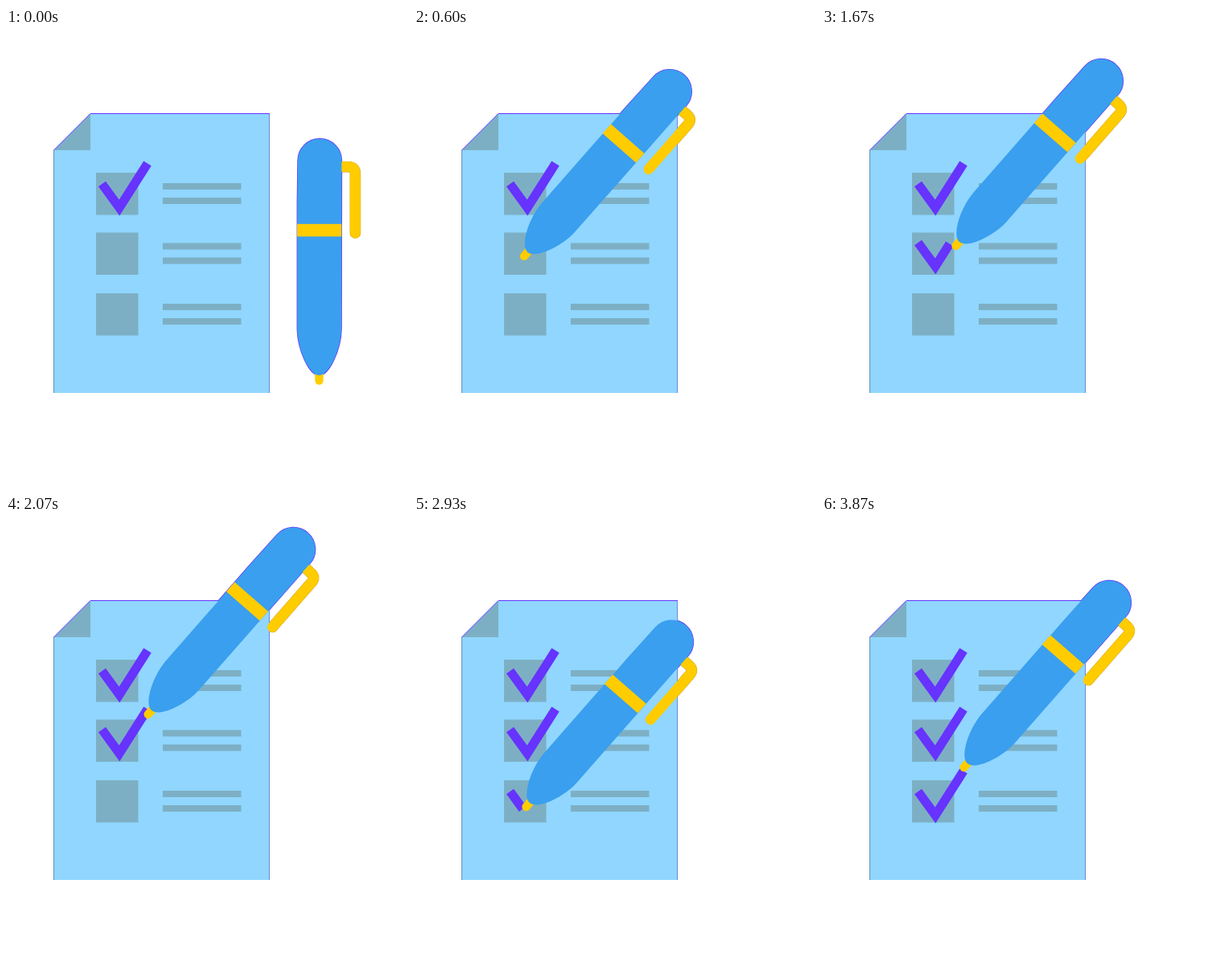
An HTML page for the animation above (5.01 s loop, 500 by 571 pixels).

```html
<!DOCTYPE html>
<html lang="en">
<head>
<meta charset="utf-8">
<title>Checklist</title>
<style>
  html, body { margin: 0; width: 100%; height: 100%; overflow: hidden; background: #fff; }
  svg { display: block; width: 100%; height: 100%; }
  .paper { fill: #90d6ff; }
  .grey { fill: #7dafc4; }
  .tick { fill: none; stroke: #6633ff; stroke-width: 11.2; stroke-linejoin: miter; }
  .edge { fill: none; stroke: #6633ff; stroke-width: 1; }
</style>
</head>
<body>
<svg viewBox="0 0 500 571">
  <defs>
    <!-- Pen parts, with the writing point at the origin -->
    <path id="barrel" d="M-26.5-273.5A27.2 27.2 0 0 1 28-273.5L27.6-63.5C27-38.5 12.5-6.5 0-6.5S-26.6-38.5-27.2-63.5L-27.2-220Z"/>
    <path id="clip" d="M25-265.8H36.5Q44.9-265.8 44.9-257.5V-183.5" fill="none" stroke-linecap="round"/>
  </defs>

  <!-- Dark rim, seen only where the pen leaves the paper -->
  <g class="pen">
    <use href="#clip" stroke="#c99a10" stroke-width="13.6"/>
    <use href="#barrel" fill="#6633ff" stroke="#6633ff" stroke-width="1.4"/>
  </g>

  <path class="paper" d="M105 106H328V454H59V152Z"/>
  <path class="grey" d="M105 107V152H60Z"/>
  <path class="edge" d="M59.5 152L105 106.5H328"/>
  <path class="edge" d="M59.5 152V454" style="stroke:#5f8fb4"/>
  <path class="edge" d="M327.5 107V454" style="stroke:#6d86d8"/>
  <g id="rows"></g>

  <g class="pen">
    <rect x="-5.2" y="-20" width="10.4" height="25.2" rx="5.2" fill="#ffcc00"/>
    <use href="#clip" stroke="#ffcc00" stroke-width="12.8"/>
    <use href="#barrel" fill="#3a9fee"/>
    <rect x="-27.4" y="-194.7" width="55.2" height="15.6" fill="#ffcc00"/>
  </g>
</svg>
<script>
const LOOP = 5010, STEP = 100 / 3, TILT = 41.2;

// Each row: box top, tick offset, first and last step of its tick
const rows = [
  { y: 180, shift: 0, from: -1, to: 0 },
  { y: 254.5, shift: 73, from: 24, to: 62 },
  { y: 330, shift: 150, from: 78, to: 116 }
];

// Pen moves as [step, x, y, tilt]; it rests between them
const moves = [
  [[0, 389.5, 438.5, 0], [5, 349, 416, 13.5], [11, 236, 361, 30.4],
   [16, 159, 301, 40.7], [19, 127, 276, TILT]],
  [[24, 127, 276, TILT], [31, 137, 293, TILT], [35, 143.5, 301, TILT], [40, 154, 292.5, TILT],
   [50, 166.5, 271, TILT], [56, 172, 257, TILT], [62, 176.7, 248, TILT]],
  [[72, 176.7, 248, TILT], [78, 124.5, 342, TILT]],
  [[78, 124.5, 342, TILT], [88, 139.5, 363, TILT], [98, 156.5, 354, TILT],
   [104, 164, 340.7, TILT], [116, 176.5, 314, TILT]]
];

const clamp = (v, lo, hi) => Math.min(hi, Math.max(lo, v));

function add(parent, tag, attrs) {
  const el = document.createElementNS('http://www.w3.org/2000/svg', tag);
  for (const k in attrs) el.setAttribute(k, attrs[k]);
  return parent.appendChild(el);
}

const list = document.getElementById('rows');
for (const r of rows) {
  add(list, 'rect', { class: 'grey', x: 112, y: r.y, width: 52.5, height: 52.5 });
  for (const dy of [13, 31])
    add(list, 'rect', { class: 'grey', x: 195, y: r.y + dy, width: 97.5, height: 8 });
  r.tick = add(list, 'path', {
    class: 'tick', pathLength: 1, d: 'M119.5 194L141 223.5L176 168.5',
    transform: `translate(0 ${r.shift})`
  });
}
const pens = document.querySelectorAll('.pen');

// Smooth curve through the keys, tangents taken from the neighbours
function sample(keys, step) {
  const last = keys.length - 1;
  const t = clamp(step, keys[0][0], keys[last][0]);
  let i = 0;
  while (i < last - 1 && t >= keys[i + 1][0]) i++;
  const a = keys[i], b = keys[i + 1], span = b[0] - a[0], u = (t - a[0]) / span;
  const slope = (j, c) => {
    const p = keys[Math.max(0, j - 1)], n = keys[Math.min(last, j + 1)];
    return (n[c] - p[c]) / (n[0] - p[0]) * span;
  };
  const u2 = u * u, u3 = u2 * u;
  return [1, 2, 3].map(c =>
    (2 * u3 - 3 * u2 + 1) * a[c] + (u3 - 2 * u2 + u) * slope(i, c) +
    (3 * u2 - 2 * u3) * b[c] + (u3 - u2) * slope(i + 1, c));
}

function draw(ms) {
  const step = Math.floor((ms % LOOP + 4) / STEP) % 150;
  const move = moves.filter(m => m[0][0] <= step).pop();
  const [x, y, tilt] = sample(move, step);
  for (const p of pens) p.setAttribute('transform', `translate(${x} ${y}) rotate(${tilt})`);
  for (const r of rows) {
    const done = clamp((step - r.from) / (r.to - r.from), 0, 1);
    r.tick.style.display = done ? '' : 'none';
    r.tick.setAttribute('stroke-dasharray', done < 1 ? `${done} 2` : 'none');
  }
}

const start = performance.now();
function tick() {
  draw(Math.max(0, performance.now() - start));
  requestAnimationFrame(tick);
}
tick();
</script>
</body>
</html>
```
